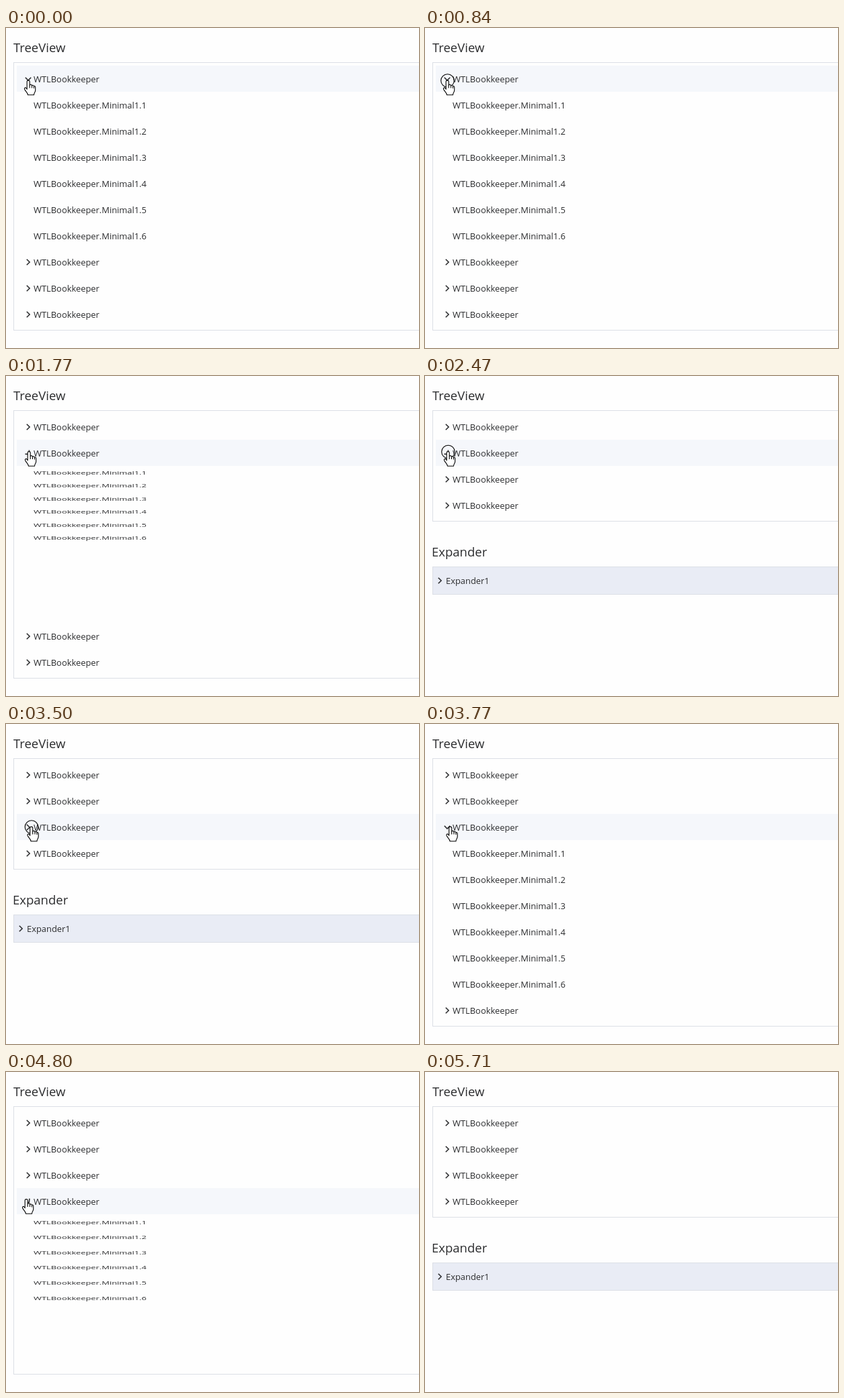
An HTML page with a canvas that plays this animation: 614x477 px, repeating every 6.11 s.

```html
<!DOCTYPE html>
<html lang="en">
<head>
<meta charset="utf-8">
<title>Tree view</title>
<style>
  html, body { margin: 0; width: 100%; height: 100%; overflow: hidden; background: #fefefe; }
  canvas { display: block; }
</style>
</head>
<body>
<canvas id="stage" width="614" height="477"></canvas>
<script>
const ctx = document.getElementById('stage').getContext('2d');
const W = 614, H = 477, LOOP = 6110, STEP = 120;
const LEFT = 11, TOP = 56, ROW = 39, ROWS = 4, CHILDREN = 6;
const BODY = 12.9, HEADING = 18.5;
const LABEL = 'WTLBookkeeper';
const INK = '#2c2d2f', LINE = '#dcdfe6';

// Each click shows a ring, then toggles its row. The first row starts open.
// An opening row holds `scale` for one step before it is fully open.
const clicks = [
  { ring: 840, at: 960, row: 0 },
  { ring: 1620, at: 1770, row: 1, scale: .5 },
  { ring: 2350, at: 2470, row: 1 },
  { ring: 3500, at: 3650, row: 2, scale: .5 },
  { ring: 4170, at: 4170, row: 2 },
  { ring: 4680, at: 4800, row: 3, scale: .58 },
  { ring: 5230, at: 5350, row: 3 }
];

const home = { x: 33.5, y: 78.5 };
const moves = [
  { from: 1140, to: 1620, x: 34.5, y: 113 },
  { from: 2620, to: 3100, x: 38, y: 180 },
  { from: 3260, to: 3500, x: 38, y: 153.5 },
  { from: 4320, to: 4680, x: 30.5, y: 190 }
];
const POINTER_END = 5590;

const mix = (a, b, k) => a + (b - a) * k;

function pointerAt(t) {
  let { x, y } = home;
  for (const m of moves) {
    if (t < m.from) break;
    const gone = Math.floor((t - m.from) / STEP) * STEP;
    const k = Math.min(1, gone / (m.to - m.from));
    x = mix(x, m.x, k);
    y = mix(y, m.y, k);
  }
  return { x, y };
}

function branchAt(t) {
  const last = clicks.filter(c => t >= c.at).pop();
  if (!last) return { row: 0, scale: 1, turn: 1 };
  const age = t - last.at;
  if (last.scale) {
    const scale = age < STEP ? last.scale : 1;
    return { row: last.row, scale, turn: scale };
  }
  return { row: last.row, scale: 0, turn: age < STEP ? .5 : 0 };
}

// The ring goes when a row starts to open, or one step after it closes.
const ringAt = t => clicks.some(c => t >= c.ring && t < c.at + (c.scale ? 0 : STEP));

function text(str, x, y, size) {
  ctx.font = `${size}px "Open Sans", "Noto Sans", sans-serif`;
  ctx.fillStyle = INK;
  ctx.fillText(str, x, y);
}

function box(y, h, fill) {
  ctx.fillStyle = fill;
  ctx.fillRect(LEFT, y, W, h);
  ctx.strokeStyle = LINE;
  ctx.lineWidth = 1;
  ctx.strokeRect(LEFT + .5, y + .5, W, h - 1);
}

function chevron(x, y, turn) {
  ctx.save();
  ctx.translate(x, y);
  ctx.rotate(turn * Math.PI / 2);
  ctx.beginPath();
  ctx.moveTo(-2.2, -4.2);
  ctx.lineTo(2.1, 0);
  ctx.lineTo(-2.2, 4.2);
  ctx.strokeStyle = INK;
  ctx.lineWidth = 1.6;
  ctx.stroke();
  ctx.restore();
}

function children(top, scale) {
  ctx.save();
  ctx.translate(0, top);
  ctx.scale(1, scale);
  for (let i = 0; i < CHILDREN; i++) {
    text(`${LABEL}.Minimal1.${i + 1}`, 41, i * ROW + 25, BODY);
  }
  ctx.restore();
}

// Returns the bottom edge of the panel.
function tree(branch, hover) {
  const open = branch.scale > 0;
  const height = (ROWS + (open ? CHILDREN : 0)) * ROW + 10;
  box(TOP - 5, height, '#fefefe');
  for (let i = 0, y = TOP; i < ROWS; i++, y += ROW) {
    const active = i === branch.row;
    if (i === hover) {
      ctx.fillStyle = '#f5f7fb';
      ctx.fillRect(16, y, W, ROW);
    }
    chevron(33, y + 20, active ? branch.turn : 0);
    text(LABEL, 41, y + 25, BODY);
    if (active && open) {
      children(y + ROW, branch.scale);
      y += CHILDREN * ROW;
    }
  }
  return TOP - 5 + height;
}

function expander(y) {
  text('Expander', 10, y + 52, HEADING);
  box(y + 67, 42, '#e9ecf5');
  chevron(22, y + 88, 0);
  text('Expander1', 31, y + 93, BODY);
}

const hand = new Path2D(
  'M-2.3 11.5V1.3C-2.3-1 1.7-1 1.7 1.3V6.5C2.2 5.4 4.8 5.6 5 7.4C5.6 6.4 7.9 6.8 8 8.4' +
  'C8.6 7.6 10.2 8 10.2 9.8V14.5C10.2 17 8 18 8 21.2H-1C-1 18.5-4 16.5-5.8 13' +
  'C-6.8 10.8-4.6 9.8-3.6 11L-2.3 12.8Z'
);
const knuckles = new Path2D('M1.7 6.5V11M5 7.4V11M8 8.4V11.5');

function drawPointer({ x, y }, ring) {
  ctx.save();
  ctx.translate(x, y);
  ctx.strokeStyle = '#000';
  ctx.lineWidth = 1.1;
  if (ring) {
    ctx.beginPath();
    ctx.arc(0, 0, 9.8, 0, Math.PI * 2);
    ctx.stroke();
  }
  ctx.lineJoin = 'round';
  ctx.fillStyle = '#fff';
  ctx.fill(hand);
  ctx.stroke(hand);
  ctx.stroke(knuckles);
  ctx.restore();
}

function draw(t) {
  const pointer = pointerAt(t);
  const branch = branchAt(t);
  const shown = t < POINTER_END;
  // Only the row headers above any open children can be hovered.
  const hover = shown ? Math.floor((pointer.y - TOP) / ROW) : -1;

  ctx.fillStyle = '#fefefe';
  ctx.fillRect(0, 0, W, H);
  text('TreeView', LEFT, 36, HEADING);
  expander(tree(branch, hover));
  if (shown) drawPointer(pointer, ringAt(t));
}

function tick() {
  draw(performance.now() % LOOP);
  requestAnimationFrame(tick);
}
tick();
</script>
</body>
</html>
```
